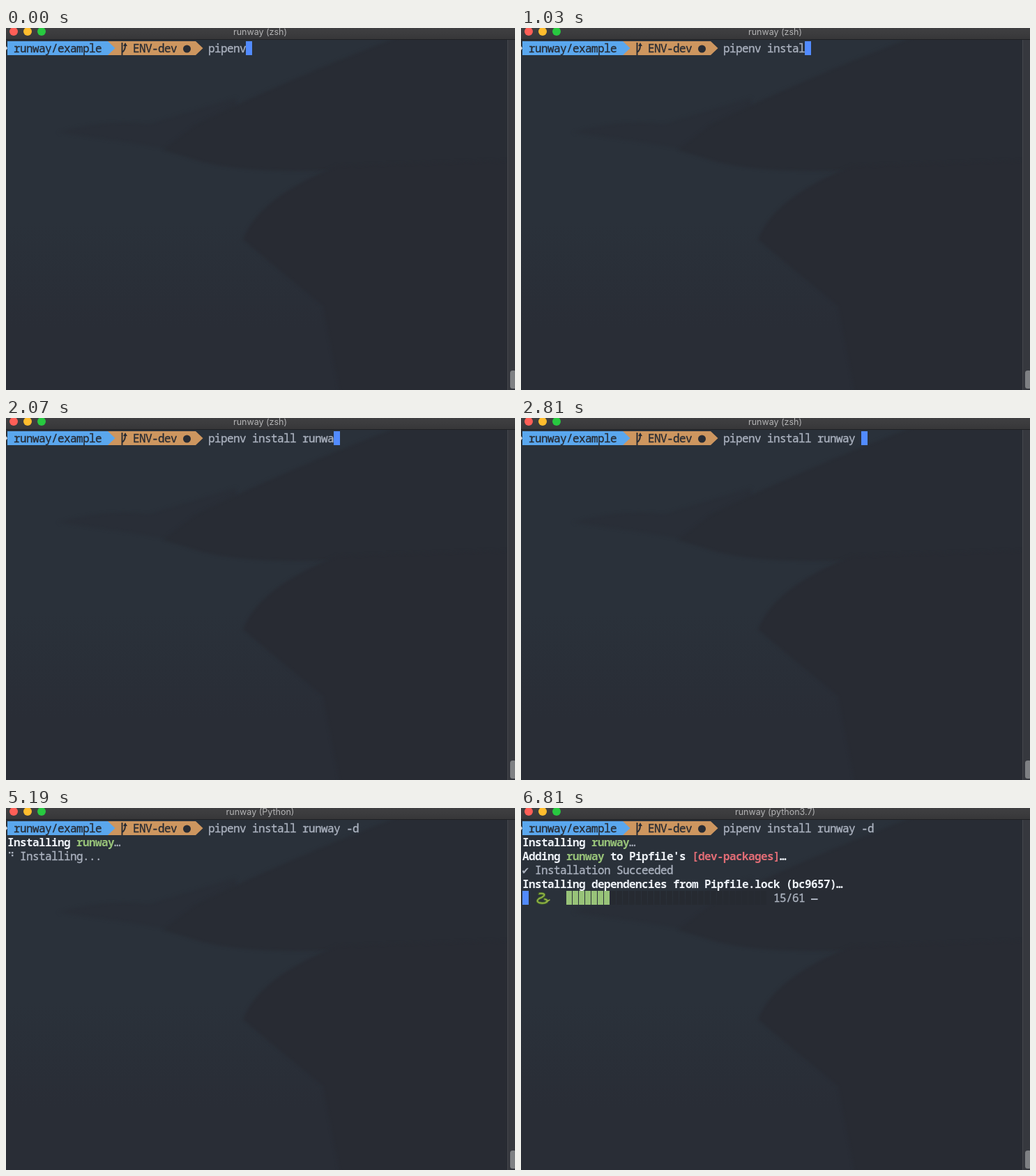
An HTML page with a canvas for the animation above (8 s loop, 730 px wide and 520 px high).

```html
<!DOCTYPE html>
<html lang="en">
<head>
<meta charset="utf-8">
<title>Terminal</title>
<style>
html, body { margin: 0; width: 730px; height: 520px; overflow: hidden; background: #282c34; }
canvas { display: block; }
</style>
</head>
<body>
<canvas id="stage" width="730" height="520"></canvas>
<script>
const LOOP = 8000, TICK = 147.6;
const CELL = 9, ROW = 20, LEFT = 2, TOP = 19, PROMPT = 32;
const MONO = '"Noto Sans Mono", "DejaVu Sans Mono", monospace';
const INK = '#282c34', GREY = '#abb2bf', WHITE = '#eef2f8', GREEN = '#98c379',
      RED = '#e06c75', BLUE = '#5aa7ee', ORANGE = '#cd965f', CURSOR = '#528bff';
// Typing bursts after the first word: text, start and length in ticks
const BURSTS = [[' ', 0, 1], ['install ', 3, 5], ['runwa', 10, 4], ['y', 15, 1], [' ', 18, 1], ['-d', 22, 2]];
const ENTER = 26, LAUNCH = 30, SPIN = 35, PIP = 37, DONE = 45, BAR = 46;
const SPINNER = '⠋⠙⠹⠸⠼⠴⠦⠧⠇⠏';
const BAR_CELLS = 32, INSTALLED = 15, PACKAGES = 61;

const ctx = document.getElementById('stage').getContext('2d');
const colX = col => LEFT + col * CELL;
const rowY = row => TOP + row * ROW;

function rect(color, x, y, w, h) {
  ctx.fillStyle = color;
  ctx.fillRect(x, y, w, h);
}

function circle(color, x, y, r) {
  ctx.fillStyle = color;
  ctx.beginPath();
  ctx.arc(x, y, r, 0, 7);
  ctx.fill();
}

function fill(color, path) {
  ctx.fillStyle = color;
  ctx.fill(new Path2D(path));
}

function stroke(color, width, path) {
  ctx.strokeStyle = color;
  ctx.lineWidth = width;
  ctx.stroke(new Path2D(path));
}

function gradient(y0, y1, from, to) {
  const g = ctx.createLinearGradient(0, y0, 0, y1);
  g.addColorStop(0, from);
  g.addColorStop(1, to);
  return g;
}

function text(str, col, row, color = GREY, weight = 500) {
  ctx.font = `${weight} 16px ${MONO}`;
  ctx.letterSpacing = '-0.6px';
  ctx.textAlign = 'left';
  ctx.fillStyle = ctx.strokeStyle = color;
  ctx.fillText(str, colX(col), rowY(row) + 16);
  if (weight < 700) {
    ctx.lineWidth = 0.35;
    ctx.strokeText(str, colX(col), rowY(row) + 16);
  }
  ctx.letterSpacing = '0px';
}

// Writes [string, color, weight] runs one after another
function line(row, ...runs) {
  let col = 0;
  for (const [str, color = WHITE, weight = 700] of runs) {
    text(str, col, row, color, weight);
    col += str.length;
  }
}

const cursor = (col, row) => rect(CURSOR, colX(col), rowY(row), CELL, ROW);

function backdrop() {
  rect(gradient(280, 430, '#2a313a', '#292d36'), 0, 0, 730, 520);
  ctx.filter = 'blur(2px)';
  fill('#292e37', 'M75 150Q140 130 205 138L330 100V190L180 165Z');
  fill('#282c34', 'M225 175L270 140Q400 75 570 10H740V215L455 205Q340 208 280 192Z');
  fill('#282b33', 'M475 198Q360 245 340 304L455 400L480 530H740V190Z');
  ctx.filter = 'none';
}

function windowFrame(tick) {
  rect(gradient(0, 16, '#404042', '#373739'), 0, 0, 730, 16);
  rect('#1f2023', 0, 16, 730, 1);
  ['#ff5f57', '#ffbd2e', '#28c940'].forEach((c, i) => circle(c, 11 + 20 * i, 5, 6));
  const job = tick < LAUNCH ? 'zsh' : tick < PIP ? 'Python' : 'python3.7';
  ctx.font = '12.5px Inter, sans-serif';
  ctx.textAlign = 'center';
  ctx.fillStyle = '#b3b3b4';
  ctx.fillText(`runway (${job})`, 364.5, 10);
  rect('#36383e', 719, 17, 11, 503);
  rect('#46484d', 719, 17, 1, 503);
  ctx.fillStyle = '#7e8083';
  ctx.beginPath();
  ctx.roundRect(723, 492, 9, 26, 3.5);
  ctx.fill();
}

function segment(color, x, width) {
  rect(color, x, TOP, width, ROW);
  fill(color, `M${x + width} ${TOP}l10.5 10l-10.5 10z`);
}

function prompt() {
  fill('#e4e8ee', 'M0 26L2 29L0 32Z');
  segment(ORANGE, 146, 126);
  segment(BLUE, 2, 144);
  text('runway/example', 1, 0, INK);
  text('ENV-dev', 20, 0, INK);
  circle(INK, 259.5, 30, 5.5);
  stroke(INK, 2, 'M166.5 21V39M166.5 35Q171 32 171 25');
  fill(INK, 'M168 26L171 21L174 26Z');
}

function command(tick) {
  return BURSTS.reduce((typed, [str, start, length]) => {
    const part = Math.min(1, Math.max(0, (tick - start) / length));
    return typed + str.slice(0, Math.floor(str.length * part));
  }, 'pipenv');
}

function spinner(tick) {
  const phase = 1 + Math.floor((tick - SPIN) * 1.75);
  // The low bits of a braille code point tell which dots are raised
  const dots = SPINNER.charCodeAt(phase % SPINNER.length) & 63;
  for (let i = 0; i < 6; i++) {
    if (dots >> i & 1) rect(GREY, 4 + 4 * Math.floor(i / 3), 63 + 4 * (i % 3), 2.4, 2.4);
  }
  text('Installing...', 2, 2);
}

function snake() {
  const body = 'M26 123Q35 122 33 126Q30 129 26 130Q21 134 26 136Q33 138 37 135Q39 132 34 131';
  ctx.lineCap = 'round';
  stroke('#4f7a2c', 3.5, body);
  stroke('#9cb64a', 1.5, body + 'M36 135L41 132');
  ctx.lineCap = 'butt';
  circle('#26301c', 25, 122.5, 0.8);
}

function progressBar() {
  snake();
  const filled = Math.floor(BAR_CELLS * INSTALLED / PACKAGES);
  for (let i = 0; i < BAR_CELLS; i++) {
    rect(i < filled ? GREEN : '#262a31', colX(7 + i), rowY(5), CELL - 1, ROW);
  }
  text(`${INSTALLED}/${PACKAGES}`, 40, 5);
  text('—', 46, 5, GREY, 700);
}

function draw(tick) {
  backdrop();
  windowFrame(tick);
  prompt();
  const typed = command(tick);
  text(typed, PROMPT, 0);
  if (tick < ENTER) return cursor(PROMPT + typed.length, 0);
  if (tick < SPIN) return cursor(0, 1);

  line(1, ['Installing '], ['runway', GREEN], ['…', GREY, 500]);
  if (tick < DONE) return spinner(tick);

  line(2, ['Adding '], ['runway', GREEN], [" to Pipfile's "], ['[dev-packages]', RED], ['…']);
  ctx.font = '14px "DejaVu Sans", sans-serif';
  ctx.fillStyle = GREY;
  ctx.fillText('✔', 0.5, 95);
  text('Installation Succeeded', 2, 3);
  line(4, ['Installing dependencies from Pipfile.lock (bc9657)…']);
  cursor(0, 5);
  if (tick >= BAR) progressBar();
}

const start = performance.now();
function animate() {
  const t = (performance.now() - start) % LOOP;
  draw(Math.floor((t + 5) / TICK));
  requestAnimationFrame(animate);
}
animate();
</script>
</body>
</html>
```
